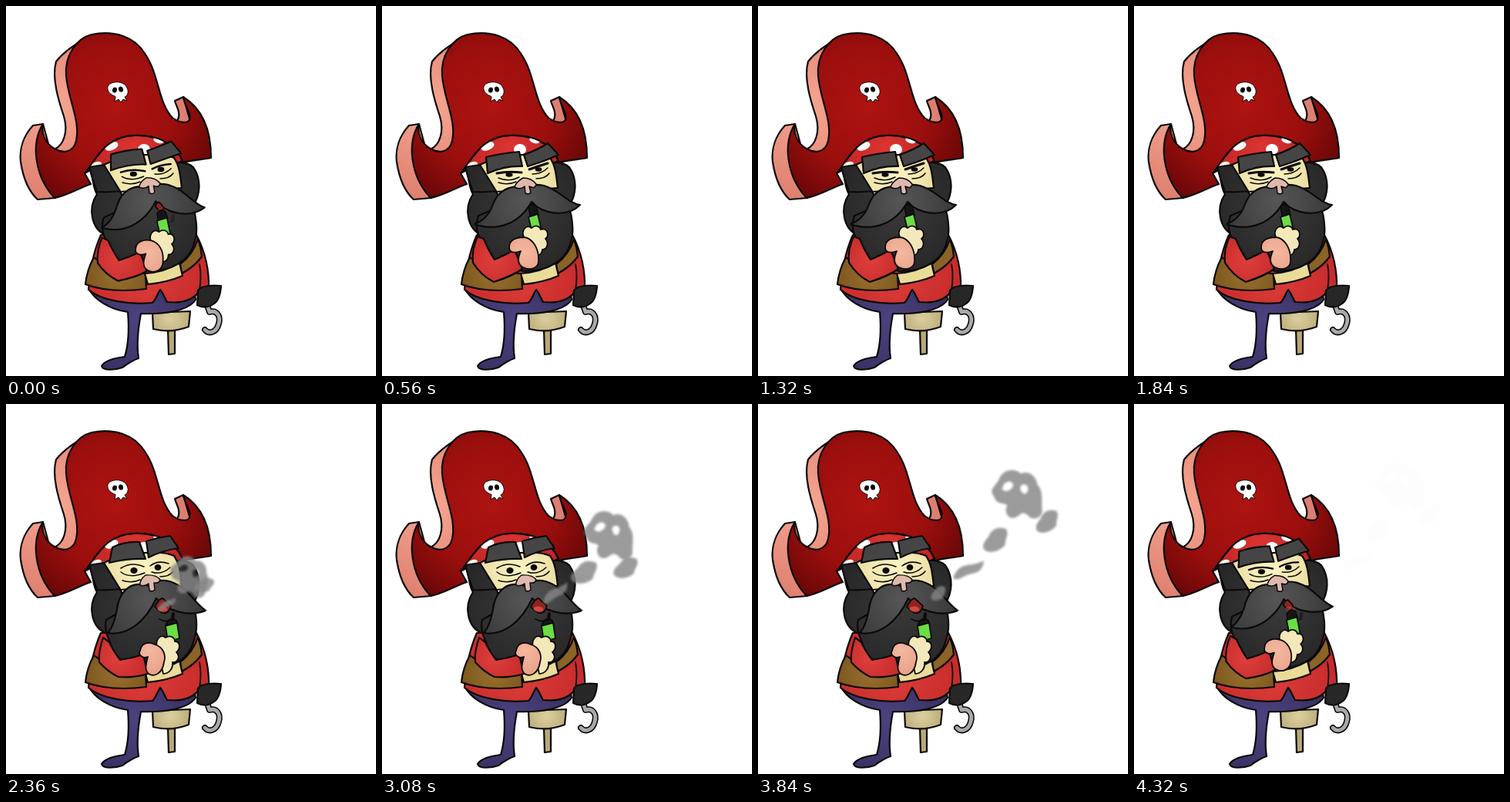
Write an HTML page with a canvas that moves like this. It is 480 px wide and 480 px high and loops after 4360 ms.

```html
<!DOCTYPE html>
<html lang="en">
<head>
<meta charset="utf-8">
<title>Pirate puff</title>
<style>
html, body { margin: 0; width: 100%; height: 100%; overflow: hidden; background: #fff; }
canvas { display: block; width: 480px; height: 480px; }
</style>
</head>
<body>
<canvas id="stage" width="480" height="480"></canvas>
<script>
const ctx = document.getElementById('stage').getContext('2d');
const LOOP = 4360;
const INK = '#0b0909';

const lerp = (a, b, p) => a + (b - a) * p;
const clamp = v => Math.max(0, Math.min(1, v));
const ease = v => { v = clamp(v); return v * v * (3 - 2 * v); };

// Blend two path strings that share the same commands.
function morph(a, b, p) {
  const nums = b.match(/-?[\d.]+/g);
  let i = 0;
  return a.replace(/-?[\d.]+/g, n => lerp(+n, +nums[i++], p).toFixed(2));
}

function glow(x, y, r, ...colors) {
  const g = ctx.createRadialGradient(x, y, 0, x, y, r);
  colors.forEach((c, i) => g.addColorStop(i / (colors.length - 1), c));
  return g;
}

function shape(d, fill, width = 2.2) {
  const path = new Path2D(d);
  if (fill) { ctx.fillStyle = fill; ctx.fill(path); }
  if (width) { ctx.lineWidth = width; ctx.strokeStyle = INK; ctx.stroke(path); }
}

const line = (d, width = 1.8) => shape(d, null, width);

function oval(x, y, rx, ry, turn, fill) {
  ctx.beginPath();
  ctx.ellipse(x, y, rx, ry, turn, 0, 7);
  ctx.fillStyle = fill;
  ctx.fill();
}

function drawBody() {
  // hook
  const hook = new Path2D('M262 391 L264 397 C273 394 279 402 276 412 C273 424 263 426 258 420');
  ctx.strokeStyle = INK; ctx.lineWidth = 8; ctx.stroke(hook);
  ctx.strokeStyle = '#a9a9a9'; ctx.lineWidth = 4.8; ctx.stroke(hook);
  // peg leg
  shape('M210 419 L219 418 L219 451 L211 452 Z', '#b9a976');
  shape('M190 398 L239 396 L237 416 Q214 425 191 419 Z', glow(213, 405, 32, '#dccf9f', '#b5a673'));
  // trousers
  shape('M107 366 C115 382 136 394 158 397 C160 420 159 439 154 455 C139 457 128 460 124 467 C126 474 143 472 151 469 C159 463 166 459 172 457 C169 438 172 415 175 399 C205 400 236 396 246 381 L243 366 Z',
    glow(170, 410, 75, '#4c427f', '#393163'));
  // coat
  shape('M123 297 C112 322 109 345 107 368 C123 382 160 388 190 385 C195 380 196 374 200 368 C205 374 206 380 209 384 C228 386 243 381 251 370 L263 369 C264 344 258 318 247 297 Z',
    glow(180, 350, 105, '#dc3d39', '#bf2626'));
  line('M251 370 Q254 350 251 335');
  shape('M249 369 C254 362 270 362 279 363 C278 377 275 383 270 386 Q260 394 248 388 Z', '#272727');
  // belt
  shape('M114 326 Q139 346 181 347 L182 367 Q135 373 103 361 Q105 342 114 326 Z', glow(145, 350, 50, '#97702d', '#78531c'));
  shape('M226 335 Q243 322 249 302 Q253 313 254 325 Q245 338 228 347 Z', '#8a6325');
  shape('M180 347 Q207 345 225 333 L229 350 Q208 359 184 361 Z', '#e9dc98');
}

function drawHat() {
  const pink = glow(65, 130, 125, '#f6a690', '#dd7f70');
  // thickness of the brim and crown
  shape('M48 153 L35 155 C23 168 17 185 19 202 C22 222 29 240 41 251 L64 249 L58 190 Z', pink);
  shape('M112 38 C93 47 77 57 65 72 C59 93 68 122 75 143 C81 163 75 180 63 186 L75 192 L98 184 L112 80 Z', pink);
  shape('M230 118 L219 123 C221 131 226 136 224 144 C223 149 220 151 217 150 L240 153 Z', pink);
  // front
  shape('M48 153 C32 178 37 221 63 249 C79 246 93 237 110 231 L102 217 C116 201 128 169 166 168 C192 167 219 176 229 203 C242 200 255 199 266 197 C266 163 256 134 230 118 C232 130 241 140 238 147 C236 153 225 152 216 145 C197 125 199 90 181 63 C167 39 139 31 111 37 C91 42 76 65 78 90 C80 120 97 149 91 175 C87 192 72 191 61 184 C52 178 45 166 48 153 Z',
    glow(140, 130, 165, '#ae1311', '#9a0f0d', '#560405'));
  // emblem
  shape('M137 115 C130 111 130 102 137 100 C144 97 154 99 157 106 C160 112 157 117 154 118 L157 123 L152 121 L149 125 L146 121 L141 124 L142 118 Z', '#fff', 1);
  oval(141, 109, 3, 3.5, .2, INK);
  oval(149, 108, 3, 3.6, -.2, INK);
}

function drawBandana() {
  const d = 'M102 217 C116 201 128 169 166 168 C192 167 219 176 229 201 L219 205 L130 208 Q114 209 102 217 Z';
  shape(d, glow(165, 184, 65, '#dc3431', '#bd2424'));
  ctx.save();
  ctx.clip(new Path2D(d));
  oval(137, 182, 9, 5, -.4, '#fff');
  oval(179, 186, 8, 7, 0, '#fff');
  oval(198, 174, 7, 4, .3, '#fff');
  oval(116, 208, 9, 5, -.5, '#fbf5e6');
  ctx.restore();
  line(d);
}

function drawHead(p) {
  const hair = glow(185, 265, 90, '#393939', '#262626');
  // side hair
  shape('M111 209 C112 228 114 238 118 244 C106 262 110 290 131 298 L160 270 L147 237 L128 205 Z', hair);
  shape('M219 203 Q235 202 243 209 C254 225 252 245 243 259 L224 250 Z', hair);
  drawHat();
  drawBandana();
  shape('M127 206 C150 194 200 188 218 197 C225 207 226 219 228 236 L147 241 Q134 225 127 206 Z', glow(178, 215, 58, '#fcf3c3', '#e9dc9f'));
  shape('M108 209 L127 206 L148 240 Q132 242 118 241 Q112 226 108 209 Z', hair);

  // beard
  shape(morph(
    'M125 272 C119 290 126 302 133 310 C137 330 157 342 184 344 C214 344 238 332 245 306 C250 292 246 270 242 260 L195 242 Z',
    'M130 280 C127 292 132 302 136 312 C142 331 159 342 186 343 C214 343 238 332 244 306 C249 292 247 275 244 263 L195 242 Z', p), hair);

  // eyes
  const open = lerp(2.8, 4, p);
  oval(lerp(165, 166, p), lerp(219, 216, p), 4.6, open, 0, INK);
  oval(lerp(203, 197, p), 212, 4.4, open, 0, INK);
  const lid = lerp(3, 1.6, p);
  line(morph('M149 217 Q164 214 181 216', 'M149 213 Q163 204 179 211', p), lid);
  line(morph('M191 212 Q202 208 215 204', 'M187 210 Q197 202 211 207', p), lid);
  line(morph('M151 223 Q164 229 178 222', 'M149 218 Q161 227 180 219', p), 1.5);
  line(morph('M195 218 Q207 218 215 210', 'M189 218 Q202 222 213 212', p), 1.5);
  line('M151 229 Q163 233 174 228', 1.5);
  line('M200 224 Q212 224 217 217', 1.5);

  // moustache
  shape(morph(
    'M187 235 C164 231 150 241 144 257 C139 272 131 279 120 283 C149 293 178 283 194 254 C207 269 239 276 257 258 C241 256 231 239 210 233 Q196 230 187 235 Z',
    'M186 236 C164 229 150 240 145 260 C142 278 139 289 132 297 C157 301 181 283 195 252 C207 268 237 277 259 268 C243 257 236 237 212 230 Q195 226 186 236 Z', p),
    glow(185, 253, 75, '#565656', '#383838'));

  // mouth
  shape(morph(
    'M194 258 Q195 255 197 256 L199 260 Q201 263 199 264 Q196 262 194 258 Z',
    'M193 263 Q198 253 203 252 L214 262 Q211 273 203 271 Q197 268 193 263 Z', p), '#8d2420', 1.8);
  ctx.globalAlpha = p;
  oval(203, 266, 6.5, 3.4, .1, '#cc4a42');
  line('M199 279 Q207 284 214 280', 1.5);
  ctx.globalAlpha = 1;

  // nose
  shape(morph(
    'M183 223 Q174 228 172 235 Q179 239 185 234 L186 243 Q191 245 193 242 L191 234 Q199 238 200 231 Q194 223 183 223 Z',
    'M181 222 Q173 228 174 235 Q180 237 185 233 L186 242 Q190 244 193 241 L192 232 Q199 233 200 228 Q195 221 181 222 Z', p), '#e0b9ae', 1.5);

  // brows
  shape(morph(
    'M135 196 Q155 191 178 189 L182 208 Q160 207 137 217 Z',
    'M138 186 Q154 178 173 179 L181 201 Q158 200 134 206 Z', p), '#454545');
  shape(morph(
    'M184 193 Q203 186 215 178 L229 193 Q212 201 189 208 Z',
    'M182 178 Q198 173 213 171 L224 187 Q203 190 185 199 Z', p), '#454545');
}

function drawArm(p) {
  shape(morph(
    'M124 299 C117 314 117 324 118 333 C126 346 137 354 145 358 C157 354 170 350 182 341 L172 316 Q158 324 146 329 Q137 315 132 302 Z',
    'M126 303 C121 318 120 328 121 335 C130 345 137 350 146 354 C157 355 171 354 184 350 L178 325 Q163 330 148 332 Q139 320 134 309 Z', p),
    glow(145, 330, 42, '#de3f3c', '#c42a2a'));

  // pen
  shape(morph(
    'M190 260 Q195 255 200 259 L203 271 L192 273 Z',
    'M207 286 Q214 274 221 281 L223 286 L208 289 Z', p), '#151515', 1.4);
  ctx.globalAlpha = p;
  line('M216 279 L217 272', 4);
  ctx.globalAlpha = 1;
  shape(morph(
    'M190 274 L202 270 L207 291 L195 294 Z',
    'M207 288 L222 284 L225 304 L210 308 Z', p), '#6bdd45', 1.7);

  // fingers
  shape(morph(
    'M184 300 C180 290 188 283 194 288 C199 283 205 286 206 290 C214 287 218 297 212 302 C217 308 214 316 208 316 C207 324 202 324 198 322 Z',
    'M196 316 C193 305 201 298 207 303 C213 299 219 303 219 308 C227 308 226 318 221 322 C227 328 222 336 216 335 C217 345 210 350 204 350 Z', p),
    '#f3e8ba', 1.8);
  // palm
  shape(morph(
    'M165 313 C165 302 177 300 185 300 C196 302 203 315 203 327 C205 340 193 344 183 339 C175 335 176 327 180 318 C172 321 165 320 165 313 Z',
    'M174 320 C176 309 186 308 193 312 C204 315 208 326 205 335 C203 349 193 355 185 350 C179 344 182 337 184 328 C177 331 171 325 174 320 Z', p),
    glow(185, 320, 32, '#f5b8a0', '#e8a189'), 1.8);
}

// Keys are [time, x, y, scale, turn].
function keyed(keys, t) {
  let i = 1;
  while (i < keys.length - 1 && keys[i][0] < t) i++;
  const a = keys[i - 1], b = keys[i];
  const p = clamp((t - a[0]) / (b[0] - a[0]));
  return a.map((v, k) => lerp(v, b[k], p));
}

const skull = new Path2D(
  'M-31 1 C-37 -8 -27 -12 -24 -20 C-18 -34 -3 -34 4 -27 C14 -32 24 -23 25 -13 C33 -5 30 9 31 19 C32 29 18 34 13 26 C8 22 6 22 0 27 C-8 33 -16 27 -15 17 C-10 9 -20 13 -27 8 Z ' +
  'M-20 -7 Q-18 -18 -9 -17 Q-3 -13 -8 -8 Q-14 -2 -20 -7 Z M3 -10 Q6 -16 12 -12 Q15 -4 9 -1 Q3 -3 3 -10 Z');
const lump = new Path2D('M-17 4 C-16 -5 -7 -5 -3 -10 C5 -15 12 -12 17 -8 C19 -1 11 3 9 9 C2 14 -14 13 -17 4 Z');
const wisp = new Path2D('M-20 10 Q-15 -5 -2 -7 Q12 -8 20 -13 Q19 0 9 3 Q-2 5 -8 9 Q-15 13 -20 10 Z');

const puffs = [
  [skull, [[2230, 207, 258, .1, .5], [2360, 238, 224, .8, .25], [3080, 295, 171, 1, .05], [3840, 337, 118, 1.02, 0], [4320, 345, 107, 1, 0]]],
  [lump, [[2260, 210, 256, .1, 0], [2360, 257, 235, .75, 0], [3080, 316, 213, 1, -.25], [3840, 375, 153, 1, -.45], [4320, 383, 145, .95, -.45]]],
  [lump, [[2300, 207, 260, .1, 0], [2700, 230, 244, .7, 0], [3080, 262, 219, 1.08, -.25], [3840, 308, 177, 1.08, -.4], [4320, 316, 166, 1, -.4]]],
  [wisp, [[2240, 205, 264, .25, 0], [2360, 209, 260, .6, -.1], [3080, 225, 246, .9, -.2], [3840, 273, 216, 1, 0], [4320, 291, 204, 1, 0]]],
  [lump, [[3300, 206, 263, .15, 0], [3840, 234, 246, .65, -.4], [4320, 246, 236, .65, -.4]]]
];

function drawSmoke(t) {
  if (t < 2230) return;
  const fade = 1 - ease((t - 3940) / 420);
  ctx.save();
  ctx.filter = 'blur(1.6px)';
  ctx.fillStyle = '#858585';
  ctx.globalAlpha = .82 * fade;
  for (const [path, keys] of puffs) {
    if (t < keys[0][0]) continue;
    const [, x, y, size, turn] = keyed(keys, t);
    ctx.save();
    ctx.translate(x, y);
    ctx.rotate(turn);
    ctx.scale(size, size);
    ctx.fill(path, 'evenodd');
    ctx.restore();
  }
  ctx.restore();
}

// 0 is drawing on the pen, 1 is breathing out.
function pose(t) {
  const wrapped = t < 1000;
  const fall = 1 - ease(((wrapped ? t + LOOP : t) - 4080) / 460);
  return wrapped ? fall : Math.min(ease((t - 2020) / 280), fall);
}

function draw(now) {
  const t = now % LOOP;
  const p = pose(t);
  ctx.fillStyle = '#fff';
  ctx.fillRect(0, 0, 480, 480);
  ctx.lineJoin = ctx.lineCap = 'round';
  drawBody();
  drawHead(p);
  drawArm(p);
  drawSmoke(t);
}

let start;
function tick(now) {
  start ??= now;
  draw(now - start);
  requestAnimationFrame(tick);
}
draw(0);
requestAnimationFrame(tick);
</script>
</body>
</html>
```
